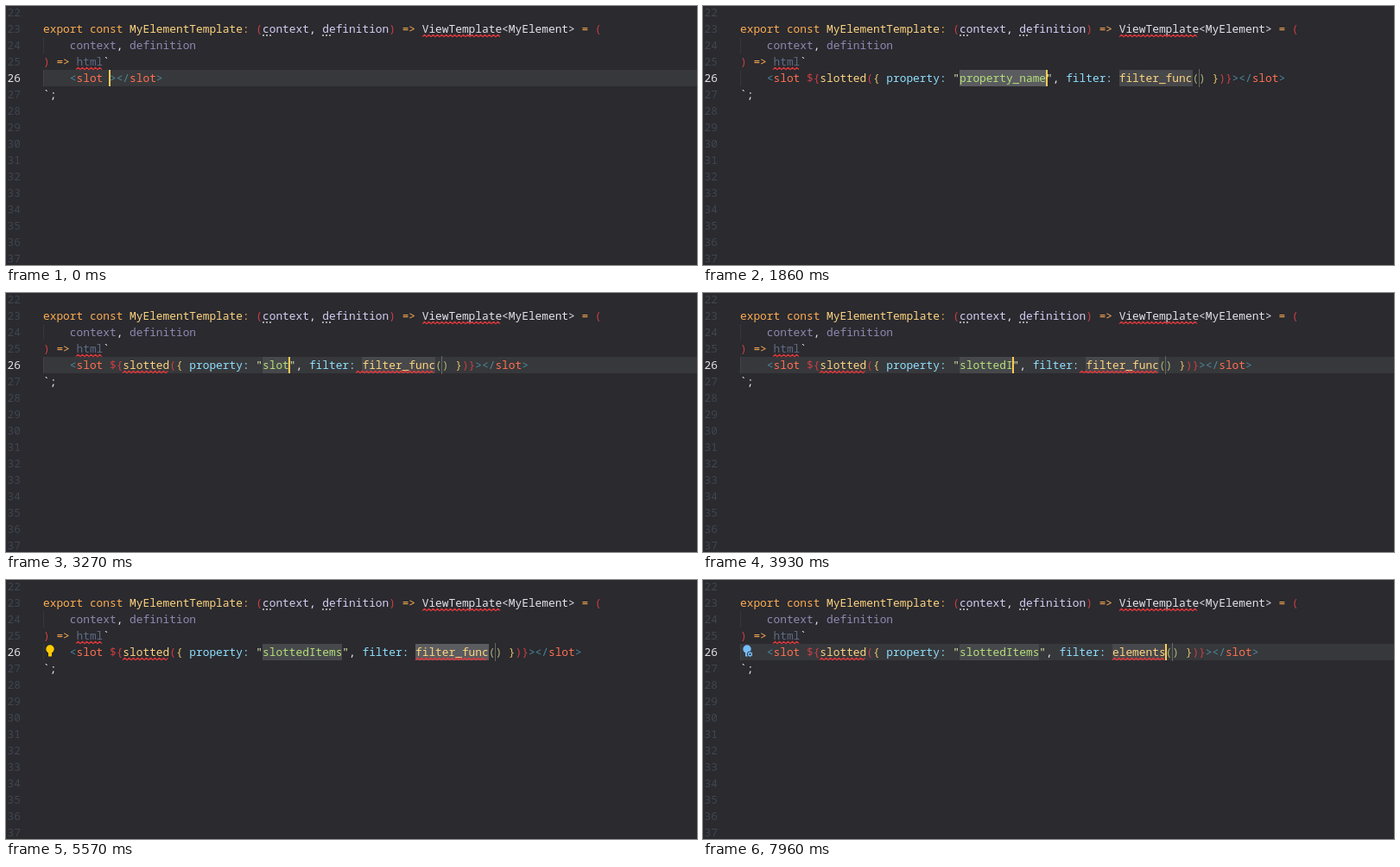
These frames come from a looping animation (800x300 px, 8000 ms). An HTML page with a canvas:

```html
<!DOCTYPE html>
<html lang="en">
<head>
<meta charset="utf-8">
<title>Slotted directive completion</title>
<style>
html, body { margin: 0; width: 100%; height: 100%; overflow: hidden; background: #2a2a2f; }
canvas { display: block; }
</style>
</head>
<body>
<canvas id="stage" width="800" height="300"></canvas>
<script>
const ctx = document.getElementById('stage').getContext('2d');
const LOOP = 8000, LEFT = 43, CHAR = 7.697, ROW = 19;
const FONT = '"Noto Sans Mono", "DejaVu Sans Mono", monospace';
const CODE = `12.83px ${FONT}`, BOLD = `bold ${CODE}`, SMALL = `11px ${FONT}`;
const C = {
  bg: '#2a2a2f', band: '#37383b', num: '#3f4650', white: '#e6e3ee',
  orange: '#ffad52', yellow: '#ffd580', red: '#cc3e44', param: '#d6cdf2',
  dim: '#9088b0', html: '#5f6b84', teal: '#4b8a9b', tag: '#ff7050',
  attr: '#8c9c99', cyan: '#8fe0ff', green: '#b5e07a', quote: '#dfe8b0',
  brace: '#e3c068', olive: '#a9b47a', error: '#e5383b', caret: '#ffcb55'
};

const colX = col => LEFT + col * CHAR;
const rowY = n => 74 + (n - 26) * ROW;
const within = (t, spans) => spans.some(([a, b]) => t >= a && t < b);

// Number of key presses made by time t
const pressed = (t, times) => times.filter(k => t >= k).length;

function rect(x, y, w, h, color) {
  ctx.fillStyle = color;
  ctx.fillRect(x, y, w, h);
}

function text(str, x, y, color, font = CODE, align = 'left') {
  ctx.font = font;
  ctx.textAlign = align;
  ctx.fillStyle = color;
  ctx.fillText(str, x, y);
}

// Draws alternating colour name and text, returns the next column
function runs(n, col, ...parts) {
  for (let i = 0; i < parts.length; i += 2) {
    text(parts[i + 1], colX(col), rowY(n) + 14, C[parts[i]]);
    col += parts[i + 1].length;
  }
  return col;
}

function squiggle(n, col, length) {
  const x0 = Math.round(colX(col)), x1 = colX(col + length), y = rowY(n) + 17.5;
  ctx.beginPath();
  for (let x = x0, up = 0; x <= x1; x += 2.5, up ^= 1) ctx.lineTo(x, y + (up ? -1.2 : 1.2));
  ctx.strokeStyle = C.error;
  ctx.lineWidth = 1.1;
  ctx.stroke();
}

function hint(col) {
  for (let i = 0; i < 3; i++) rect(Math.round(colX(col)) + i * 4, rowY(23) + 16, 2, 2, '#a5a5ac');
}

function backdrop(band) {
  rect(0, 0, 800, 300, C.bg);
  if (band) rect(LEFT, rowY(26), 800 - LEFT, ROW, C.band);
  for (const n of [24, 26]) rect(LEFT, rowY(n), 1, ROW, 'rgba(255,255,255,.06)');
  for (let n = 22; n < 38; n++) text(n, 17, rowY(n) + 14, n === 26 ? '#e2e2e6' : C.num, CODE, 'right');

  runs(23, 0, 'orange', 'export const ', 'yellow', 'MyElementTemplate', 'orange', ': ',
    'red', '(', 'param', 'context', 'white', ', ', 'param', 'definition', 'red', ')',
    'orange', ' => ', 'white', 'ViewTemplate<MyElement>', 'orange', ' = ', 'red', '(');
  runs(24, 4, 'dim', 'context', 'white', ', ', 'dim', 'definition');
  runs(25, 0, 'red', ')', 'orange', ' => ', 'html', 'html', 'white', '`');
  runs(27, 0, 'white', '`;');
  squiggle(23, 57, 12);
  squiggle(25, 5, 4);
  hint(33);
  hint(42);
}

function caret(col) {
  rect(Math.floor(colX(col)), rowY(26), 2, ROW, C.caret);
}

function bulb(blue) {
  ctx.fillStyle = blue ? '#75beff' : '#ffcc00';
  ctx.beginPath();
  ctx.arc(51, 80, 4.7, 0, 7);
  ctx.fill();
  ctx.fillRect(49, 83, 4, 5.5);
  if (!blue) return;
  ctx.beginPath();
  ctx.arc(54.5, 86, 3.2, 0, 7);
  ctx.fill();
  ctx.strokeStyle = C.band;
  ctx.lineWidth = 1;
  ctx.stroke();
  rect(53.5, 85, 2, 2, C.band);
}

const ITEMS = [
  ['slotted', 'Slotted Directive'], ['slotted', 'Slotted Directive[filtered]'],
  ['select', ''], ['style', ''], ['script', ''], ['static', ''], ['switch', '']
];

function popup(x, typed, count, selected) {
  rect(x, 93, 432, count * ROW + 4, '#1b1b1e');
  rect(x + 1, 94, 430, count * ROW + 2, '#303031');
  ITEMS.slice(0, count).forEach(([name, detail], i) => {
    const y = 95 + i * ROW, match = name.startsWith(typed) ? typed : typed[0];
    if (i === selected) rect(x + 1, y - 1, 430, ROW, '#434344');
    ctx.strokeStyle = '#c5c5c5';
    ctx.lineWidth = 1;
    ctx.strokeRect(x + 5.5, y + 3.5, 11, 10);
    rect(x + 8, y + 6, 6, 1, '#c5c5c5');
    rect(x + 8, y + 8, 6, 1, '#c5c5c5');
    rect(x + 8, y + 10, 4, 1, '#c5c5c5');
    text(match, x + 23, y + 13, '#ffcb6b', BOLD);
    text(name.slice(match.length), x + 23 + match.length * CHAR, y + 13, '#e4e4e4');
    text(detail, x + 421, y + 12, '#a6a6a6', SMALL, 'right');
  });
}

function completing(t) {
  const n = pressed(t, [330, 400, 600, 670]), typed = 'slot'.slice(0, n);
  backdrop(true);
  runs(26, 4, 'teal', '<', 'tag', 'slot ', 'attr', typed, 'teal', '></', 'tag', 'slot', 'teal', '>');
  if (n) popup(Math.round(colX(10 + n)), typed, [0, 7, 3, 2, 2][n], t >= 1130 ? 1 : 0);
  if (!within(t, [[70, 330], [1200, 1660]])) caret(10 + n);
}

function snippet(t) {
  const nameKeys = pressed(t, [2600, 2990, 3120, 3270, 3400, 3470, 3670, 3930, 4060, 4190, 4320, 4390]);
  const funcKeys = pressed(t, [5640, 5770, 5840, 6300, 6430, 6500, 6700, 6900]);
  const name = nameKeys ? 'slottedItems'.slice(0, nameKeys) : 'property_name';
  const func = funcKeys ? 'elements'.slice(0, funcKeys) : 'filter_func';
  const nameCol = 33, funcCol = nameCol + name.length + 11, funcEnd = funcCol + func.length;
  const onFunc = t >= 5050, selecting = onFunc ? !funcKeys : !nameKeys;

  backdrop(!selecting);
  const field = (col, str, active) =>
    rect(Math.round(colX(col)), rowY(26), Math.round(str.length * CHAR), ROW,
      active && selecting ? '#5b5c60' : '#47484b');
  field(nameCol, name, !onFunc);
  field(funcCol, func, onFunc);
  rect(Math.floor(colX(funcEnd + 1)), rowY(26) - 1, 1, ROW + 2, '#66685c');

  runs(26, 4, 'teal', '<', 'tag', 'slot ', 'red', '${', 'yellow', 'slotted', 'red', '(',
    'brace', '{ ', 'cyan', 'property: ', 'quote', '"', 'green', name, 'quote', '"', 'white', ', ',
    'cyan', 'filter: ', 'yellow', func, 'olive', '()', 'brace', ' }', 'red', ')}',
    'teal', '></', 'tag', 'slot', 'teal', '>');

  if (t >= 2260) {
    const stale = nameKeys && t < 4790 ? 1 : 0;
    squiggle(26, 12, 7);
    squiggle(26, funcCol - stale, func.length + stale);
  }
  if (t >= 7560) bulb(true);
  else if (within(t, [[2060, 2600], [2860, 2990], [5310, 5640], [6040, 6300]])) bulb(false);
  if (!within(t, [[2330, 2600], [4920, 5050], [5570, 5640], [7430, 7960]]))
    caret(onFunc ? funcEnd : nameCol + name.length);
}

function draw() {
  const t = performance.now() % LOOP;
  (t < 1860 ? completing : snippet)(t);
  requestAnimationFrame(draw);
}
draw();
</script>
</body>
</html>
```
